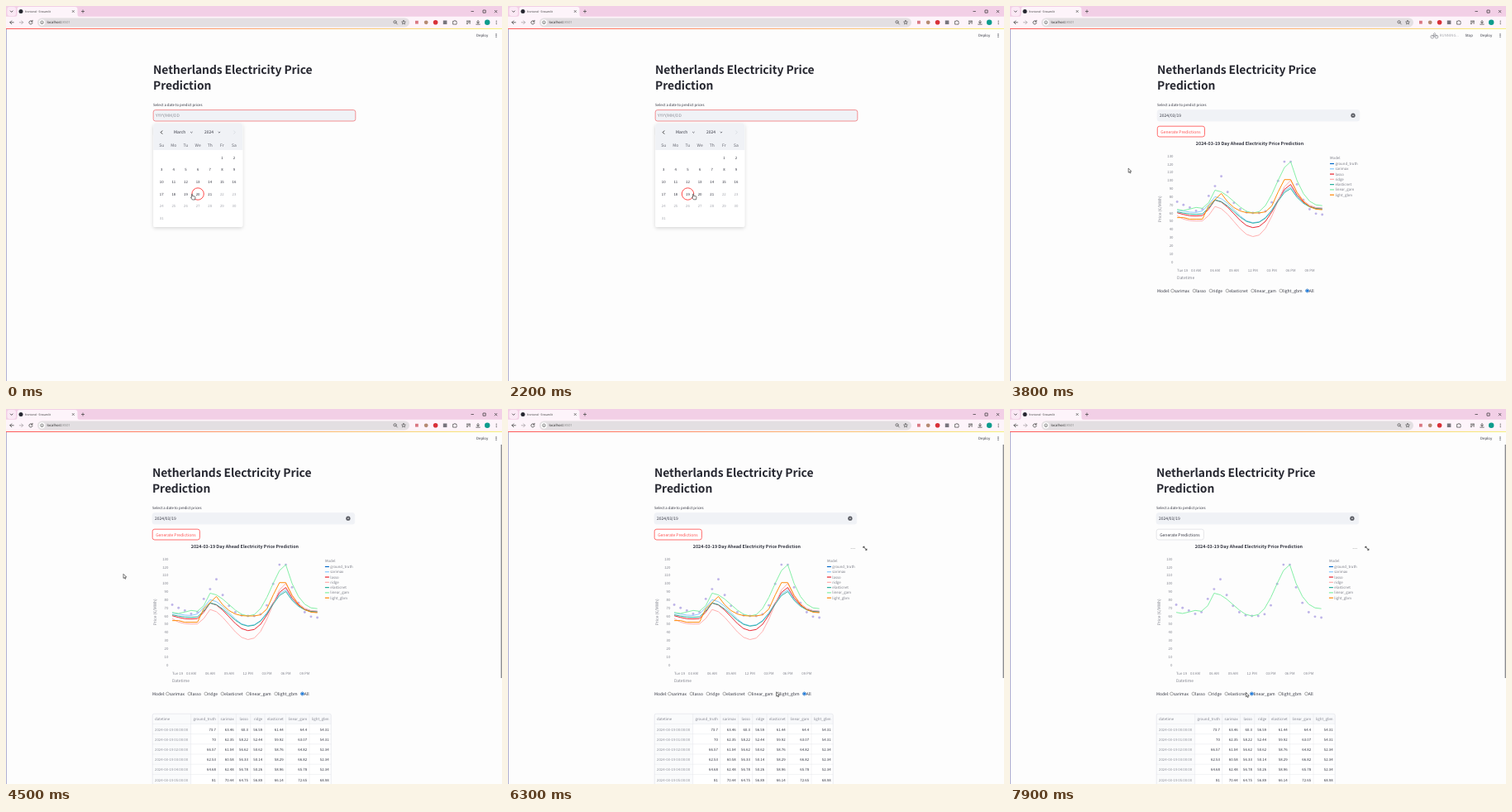
An HTML page for the animation above (8 s loop, 600 px wide and 453 px high).

```html
<!DOCTYPE html>
<html lang="en">
<head>
<meta charset="utf-8">
<title>Electricity price dashboard</title>
<style>
  html, body { margin: 0; width: 100%; height: 100%; overflow: hidden; background: #fdfdfd; }
  svg { display: block; width: 600px; height: 453px; text-rendering: geometricPrecision; }
  text { font-family: "Noto Sans CJK JP", "Noto Sans CJK SC", "Noto Sans CJK", "Noto Sans", sans-serif; white-space: pre; }
  .ui { font-family: "Open Sans", "Noto Sans", sans-serif; }
</style>
</head>
<body>
<svg id="stage" viewBox="0 0 600 453" xmlns="http://www.w3.org/2000/svg"></svg>
<script>
const LOOP = 8000;
const INK = '#31333f', GREY = '#83858f', RED = '#ff4b4b', BLUE = '#0b6fd8';
const PALE = '#f0f2f6', RULE = '#e4e6eb', PAPER = '#fdfdfd';
const SMALL = 4.35, BODY = 4.97;

// markup helpers; text is placed by the middle of its capitals
const attrs = o => Object.entries(o).map(([k, v]) => ` ${k}="${v}"`).join('');
const el = (tag, o, inner = '') => `<${tag}${attrs(o)}>${inner}</${tag}>`;
const group = (id, ...parts) => el('g', { id }, parts.join(''));
const rect = (x, y, width, height, fill, o = {}) => el('rect', { x, y, width, height, fill, ...o });
const dot = (cx, cy, r, fill, o = {}) => el('circle', { cx, cy, r, fill, ...o });
const path = (d, stroke = '#444', w = 0.8, o = {}) =>
  el('path', { d, fill: 'none', stroke, 'stroke-width': w, ...o });
const text = (x, y, s, size = BODY, fill = INK, o = {}) =>
  el('text', { x, y: +(y + size * 0.36).toFixed(2), 'font-size': size, fill, ...o }, s);
const range = n => Array.from({ length: n }, (_, i) => i);
const each = (list, fn) => list.map(fn).join('');
const MID = { 'text-anchor': 'middle' }, END = { 'text-anchor': 'end' }, BOLD = { 'font-weight': 700 };
const UI = { class: 'ui' };

const ruler = document.createElement('canvas').getContext('2d');
ruler.font = '100px "Noto Sans CJK JP", "Noto Sans CJK SC", "Noto Sans CJK", "Noto Sans", sans-serif';
const widthOf = (s, size) => ruler.measureText(s).width * size / 100;

// night: the hours listed in the table; then morning peak, noon low, evening peak, end of day
const models = [
  { name: 'ground_truth', color: '#0068c9', night: [73.7, 70, 66.57, 62.53, 64.68, 81], day: [105, 60, 123, 58], sharp: true },
  { name: 'sarimax', color: '#83c9ff', night: [63.46, 62.35, 61.04, 60.58, 62.48, 70.44], day: [80, 48, 92, 66] },
  { name: 'lasso', color: '#e8202c', night: [60.3, 58.22, 56.62, 56.33, 56.78, 64.75], day: [76, 42, 95, 65] },
  { name: 'ridge', color: '#ffabab', night: [56.59, 52.44, 50.62, 50.14, 50.26, 56.89], day: [68, 31, 100, 66] },
  { name: 'elasticnet', color: '#29b09d', night: [61.44, 59.92, 58.76, 58.29, 58.96, 66.14], day: [76, 47.5, 90, 65] },
  { name: 'linear_gam', color: '#7defa1', night: [64.4, 63.07, 64.82, 66.82, 65.78, 72.65], day: [88, 60, 123, 69] },
  { name: 'light_gbm', color: '#ff8700', night: [54.31, 54.31, 52.34, 52.34, 52.34, 68.98], day: [84, 60, 101, 64], sharp: true },
];
const forecasts = models.slice(1);

const mix = (a, b, k) => a + (b - a) * k;
const smooth = k => k * k * (3 - 2 * k);
const quick = k => 1 - (1 - k) ** 2.5;

function price({ night, day: [peak, low, top, end], sharp }, h) {
  const m = sharp ? 7 : 6, e = sharp ? 17 : 18;
  if (h < 6) return night[h];
  if (h <= m) return mix(night[5], peak, smooth((h - 5) / (m - 5)));
  if (h <= 12) return mix(peak, low, (sharp ? quick : smooth)((h - m) / (12 - m)));
  if (h <= e) return mix(low, top, smooth(((h - 12) / (e - 12)) ** (sharp ? 2.4 : 1.3)));
  return mix(top, end, quick((h - 18) / 5));
}

function browser() {
  const icon = (x, d, w, color = '#444') =>
    path(d, color, w, { transform: `translate(${x} 19.8)`, 'stroke-linecap': 'round' });
  return [
    rect(0, 0, 600, 13, '#f2cfe6'),
    rect(1.5, 1, 10.5, 11, '#fbe9f5', { rx: 3 }),
    path('M5 5.7l1.7 1.7 1.7-1.7', '#333'),
    el('path', { d: 'M11 13q2.5 0 2.5-3V4q0-3 3-3h67q3 0 3 3v6q0 3 2.5 3z', fill: '#fdf4fa' }),
    dot(18, 6.5, 2.5, '#262730'),
    text(23, 6.4, 'frontend · Streamlit', 3.42, '#333', UI),
    path('M80 5.2l2.6 2.6m0-2.6l-2.6 2.6M91 6.5h4m-2-2v4', '#444', 0.7),
    path('M562.5 6.5h3.4M577 5h3.2v3.2H577zM591 5l3.2 3.2m0-3.2L591 8.2', '#333', 0.7),
    rect(0, 12.8, 600, 14.2, '#fdf4fa'),
    rect(38, 14.4, 450, 11, '#e3dfe2', { rx: 5.5 }),
    icon(7, 'M2.2 0h-4.4m2-2l-2 2 2 2'),
    icon(18.5, 'M-2.2 0h4.4m-2-2l2 2-2 2', 0.8, '#aaa3a8'),
    icon(30, 'M1.7-1.2A2.1 2.1 0 1 0 2.1.5M2-2.5v1.6H.4'),
    dot(43.5, 19.8, 3.6, '#fff'),
    dot(43.5, 19.8, 1.8, 'none', { stroke: '#555', 'stroke-width': 0.7 }),
    path('M43.5 19.5v1.3', '#555', 0.6),
    text(49.5, 19.7, 'localhost<tspan fill="#888">:8501</tspan>', 4.2, '#222', UI),
    icon(471, 'M1.2-.5A1.6 1.6 0 1 1-2-.5 1.6 1.6 0 0 1 1.2-.5M.8.7L2.3 2.2', 0.7),
    icon(481, 'M0-2.4L.7-.8 2.4-.7 1.1.4 1.5 2.1 0 1.2-1.5 2.1-1.1.4-2.4-.7-.7-.8z', 0.6),
    rect(495, 17.8, 3.8, 3.8, '#d97782'),
    dot(508.2, 19.8, 2.4, '#b58a72'),
    dot(519.6, 19.8, 2.8, '#d93038'),
    rect(528.8, 17.5, 4.6, 4.6, '#77747c'),
    icon(543, 'M-2-1.5h1.2a.8.8 0 0 1 1.6 0H2V0a.8.8 0 0 1 0 1.2V2.3H-2z', 0.7),
    icon(559.5, 'M-2.2-1.7h4M-2.2 0h2.6M-2.2 1.7h1.2M1.6-1.5V1.5'),
    icon(571, 'M0-2.4V.9m-1.6-1.5L0 .9 1.6-.6M-2.2 2.3h4.4'),
    dot(582.2, 19.8, 3.2, '#0d9c8d'),
    each([-1.8, 0, 1.8], d => dot(593.2, 19.8 + d, 0.55, '#333')),
    rect(0, 27, 600, 1, 'url(#stripe)'),
    rect(0, 28, 0.9, 425, '#a9a8cf'),
  ].join('');
}

function appBar() {
  const wheel = x => dot(x, 37.2, 1.9, 'none', { stroke: '#85868d', 'stroke-width': 0.7 });
  return text(569, 35.8, 'Deploy', SMALL) +
    each([-1.8, 0, 1.8], d => dot(593, 35.7 + d, 0.6, INK)) +
    group('running', wheel(510.8), wheel(516),
      path('M510.8 37.2l1.5-2.4h2.8l1.2 2.4m-3.9-2.4l1.3 2.2M512 34l1.6-1.5 1.5 1.3', '#85868d', 0.7),
      text(519.8, 35.8, 'RUNNING...', SMALL, '#a5a6ad'),
      text(550.5, 35.8, 'Stop', SMALL));
}

function form() {
  const head = (y, s) => text(178, y, s, 13.86, '#262730', { ...BOLD, 'letter-spacing': -0.07 });
  return [
    head(77.2, 'Netherlands Electricity Price'),
    head(95.7, 'Prediction'),
    text(178, 119.8, 'Select a date to predict prices', SMALL),
    rect(178.2, 125.6, 244.6, 13.4, PALE, { rx: 2.6, id: 'field', 'stroke-width': 0.8 }),
    group('empty', text(181, 132.2, 'YYYY/MM/DD', BODY, '#8b8d96')),
    rect(181, 129, 0.8, 7, INK, { id: 'caret' }),
    group('filled',
      text(181, 132.2, '2024/03/19'),
      dot(415, 132.2, 2.6, '#55575f'),
      path('M414.1 131.3l1.8 1.8m0-1.8l-1.8 1.8', '#fff', 0.6)),
    rect(178.3, 145.2, 57.2, 12.8, '#fff', { rx: 2.6, id: 'button', 'stroke-width': 0.8 }),
    group('buttonText', text(182.3, 151.8, 'Generate Predictions', BODY, 'currentColor')),
  ].join('');
}

function calendar() {
  const colX = c => +(188.2 + c * 14.63).toFixed(2);
  const rowY = r => +(183.2 + r * 14.62).toFixed(2);
  const day = i => {
    const cell = i + 5;
    return text(colX(cell % 7), rowY(Math.floor(cell / 7)), i + 1, SMALL, i < 21 ? INK : '#a6a8b0', MID);
  };
  return group('calendar',
    rect(178.2, 142, 108, 125, '#fff', { rx: 2.6, filter: 'url(#shadow)' }),
    el('path', { d: 'M178.2 174v-29.4q0-2.6 2.6-2.6h102.8q2.6 0 2.6 2.6V174z', fill: PALE }),
    path('M189.2 150.6l-2 2 2 2', '#222', 0.9),
    path('M275.4 150.6l2 2-2 2', '#d5d8df'),
    text(203, 152.6, 'March'), text(240, 152.6, '2024'),
    path('M223.2 152l1.2 1.2 1.2-1.2M256.7 152l1.2 1.2 1.2-1.2', INK, 0.7),
    each(['Su', 'Mo', 'Tu', 'We', 'Th', 'Fr', 'Sa'], (d, i) => text(colX(i), 168, d, BODY, '#60626c', MID)),
    dot(0, 227, 7.2, '#fff', { id: 'ring', stroke: RED, 'stroke-width': 1 }),
    each(range(31), day));
}

function radios() {
  let x = 196.6;
  return each([...forecasts.map(m => m.name), 'All'], name => {
    const ring = stroke => dot(x, 344, 1.9, '#fff', { stroke, 'stroke-width': 0.6 });
    const out = ring('#777') + group('pick-' + name, ring(BLUE), dot(x, 344, 1.35, BLUE)) + text(x + 2.2, 344.6, name);
    x += widthOf(name, BODY) + 8.1;
    return out;
  });
}

function chart() {
  const px = h => +(202.2 + h * 7.63).toFixed(2);
  const py = v => +(309 - v * 0.983).toFixed(2);
  const hours = range(24);
  const line = m => path('M' + hours.map(h => `${px(h)} ${py(price(m, h))}`).join('L'), m.color, 0.95,
    { id: 'line-' + m.name, 'stroke-linejoin': 'round' });
  const key = (m, i) => path(`M387 ${190.5 + i * 6.28}h5`, m.color, 1.2) +
    text(393.4, 190.5 + i * 6.28, m.name, SMALL, '#7b7d87');
  const clock = h => `${String(h % 12 || 12).padStart(2, '0')} ${h < 12 ? 'AM' : 'PM'}`;
  return group('chart',
    text(290, 166.5, '2024-03-19 Day Ahead Electricity Price Prediction', 5.4, INK, { ...MID, ...BOLD }),
    each(range(14), i => text(197.5, py(i * 10), i * 10, SMALL, GREY, END)),
    text(202, 319.2, 'Tue 19', SMALL, GREY),
    each(hours.filter(h => h && h % 3 === 0), h => text(px(h), 319.2, clock(h), SMALL, GREY, MID)),
    text(202, 327.8, 'Datetime', BODY, GREY),
    el('g', { transform: 'translate(181.3 245.3) rotate(-90)' }, text(0, 0, 'Price (€/MWh)', BODY, GREY, MID)),
    each(hours, h => dot(px(h), py(price(models[0], h)), 1.45, '#b7ace6', { opacity: 0.9 })),
    each(forecasts, line),
    text(387, 183.7, 'Model', SMALL, '#7b7d87'), each(models, key),
    text(178, 344.6, 'Model:'), radios(),
    group('tools',
      each([416.3, 418.3, 420.3], x => dot(x, 168.6, 0.5, '#aaa')),
      path('M431 167.9v-1.6h1.6M431 166.3l4 4M435 168.7v1.6h-1.6', '#333', 0.9)));
}

function table() {
  const left = 177.2, top = 368.2, step = 12.2, wide = 216;
  const rowY = r => +(top + 6.6 + r * step).toFixed(2);
  let x = left + 46.4;
  const column = ({ name, night }) => {
    const border = path(`M${x} ${top}v95`, RULE, 0.5);
    x += Math.max(widthOf(name, SMALL), 11.6) + 5.7;
    return border + each([name, ...night], (s, r) => text(x - 2.8, rowY(r), s, SMALL, r ? INK : GREY, END));
  };
  return group('table',
    rect(left, top, wide, 95, '#fff'),
    rect(left, top, wide, step, '#f8f9fb'),
    rect(left, top, 46.4, 95, '#fafbfc'),
    each(range(6), r => path(`M${left} ${top + (r + 1) * step}h${wide}`, RULE, 0.5) +
      text(180, rowY(r + 1), `2024-03-19 0${r}:00:00`, SMALL, '#8f919a')),
    text(180, rowY(0), 'datetime', SMALL, GREY),
    each(models, column),
    rect(left, top, wide, 95, 'none', { rx: 2, stroke: '#dfe1e7', 'stroke-width': 0.6 }),
    rect(598.6, 43, 1.4, 282, '#8c8c90'));
}

function pointer() {
  const look = { fill: '#fff', stroke: '#222', 'stroke-width': 0.6, 'stroke-linejoin': 'round' };
  return group('pointer',
    el('path', { id: 'arrow', d: 'M0 0v5.2l1.2-1.1.8 1.9.9-.4-.8-1.8h1.7z', ...look }),
    el('path', { id: 'hand', d: 'M0 .5q.6-1 1.1 0v2l2.7.6q.7.2.6 1L4 7H.8L-1.2 4.3q.2-.7 1.2 0z', ...look }));
}

document.getElementById('stage').innerHTML =
  `<defs><linearGradient id="stripe"><stop stop-color="#ff5a5a"/><stop offset="1" stop-color="#f6f07c"/></linearGradient>
  <filter id="shadow" x="-20%" y="-20%" width="140%" height="140%"><feDropShadow dx="0" dy="1.4" stdDeviation="2.2" flood-opacity=".16"/></filter></defs>` +
  rect(0, 0, 600, 453, PAPER) + appBar() +
  group('page', form(), chart(), calendar()) + table() + browser() + pointer();

// pointer stops: time, x, y
const moves = [
  [0, 224.6, 227], [1500, 224.6, 227], [1600, 223.6, 226.8], [2400, 223.6, 226.8],
  [2900, 218.6, 156.2], [3200, 215, 154], [3800, 143.2, 196], [4200, 142, 199.3],
  [4650, 142, 199.3], [6200, 324.6, 341.8], [6700, 325, 342.5], [7300, 292, 342.5],
  [7550, 292, 342.5], [LOOP, 284.5, 342.5],
];

const $ = id => document.getElementById(id);
const show = (id, on) => $(id).setAttribute('display', on ? 'inline' : 'none');

function place(t) {
  const i = moves.findIndex(m => m[0] > t);
  const [t0, x0, y0] = moves[i - 1], [t1, x1, y1] = moves[i];
  const k = smooth((t - t0) / (t1 - t0));
  return [mix(x0, x1, k), mix(y0, y1, k)];
}

function draw(t) {
  const picked = t >= 2400, pressed = t >= 3000 && t < 6600;
  const choice = t < 6600 ? 'All' : t < 7500 ? 'light_gbm' : 'linear_gam';
  show('calendar', !picked);
  show('empty', !picked);
  show('filled', picked);
  show('caret', t < 2100 && Math.floor((t + 400) / 500) % 2 === 1);
  $('field').setAttribute('stroke', picked ? PALE : '#f0777a');
  $('ring').setAttribute('cx', t < 1600 ? 232.1 : 217.5);
  $('button').setAttribute('stroke', pressed ? RED : '#dfe0e4');
  $('buttonText').setAttribute('color', pressed ? RED : INK);
  show('running', t >= 3200 && t < 4200);
  show('chart', t >= 3800);
  show('table', t >= 4000);
  $('page').setAttribute('transform', `translate(${t >= 4000 ? -1.1 : 0} 0)`);
  show('tools', t >= 5000);
  for (const { name } of forecasts) {
    show('line-' + name, choice === 'All' || choice === name);
    show('pick-' + name, choice === name);
  }
  show('pick-All', choice === 'All');
  show('hand', !picked);
  show('arrow', picked);
  $('pointer').setAttribute('transform', `translate(${place(t).map(v => v.toFixed(2)).join(' ')})`);
}

const start = performance.now();
function tick() {
  draw(Math.max(0, performance.now() - start) % LOOP);
  requestAnimationFrame(tick);
}
tick();
</script>
</body>
</html>
```
